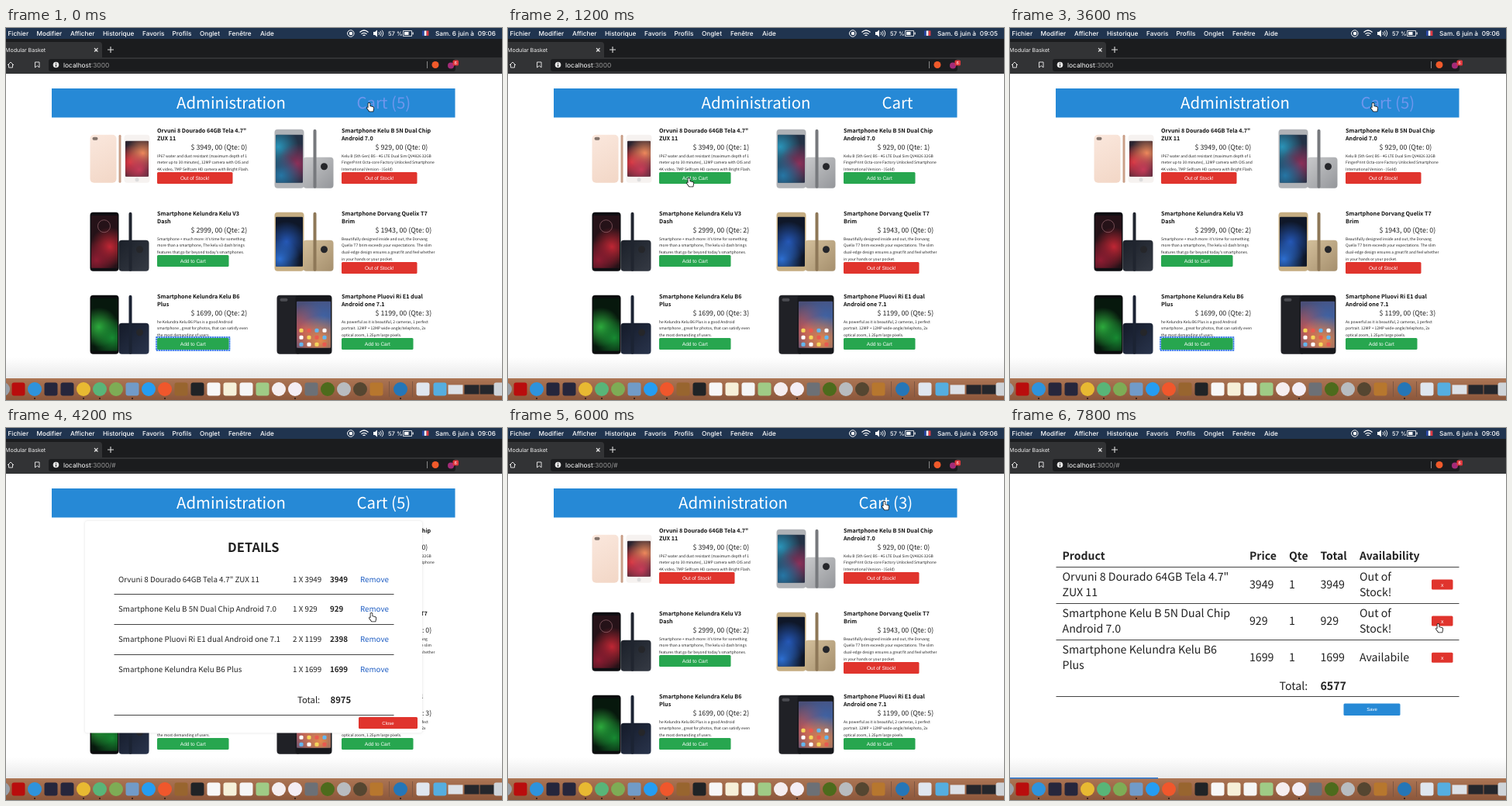
An HTML page with a canvas for the animation above (8 s loop, 640 by 480 pixels).

```html
<!DOCTYPE html>
<html lang="fr">
<head>
<meta charset="utf-8">
<style>
html, body { margin: 0; width: 100%; height: 100%; overflow: hidden; background: #fff; }
canvas { display: block; }
</style>
</head>
<body>
<canvas id="stage" width="640" height="480"></canvas>
<script>
const ctx = document.getElementById('stage').getContext('2d');
const PAGE = '"Noto Sans CJK JP", "Noto Sans CJK SC", "Noto Sans CJK", "Noto Sans", sans-serif';
const UI = 'Inter, sans-serif';
const BUTTON = '"Liberation Sans", sans-serif';
const BLUE = '#2689d6', RED = '#e0342d', GREEN = '#27a64f';
const STEP = 600, LOOP = 8000;

const PRODUCTS = [
  { title: ['Orvuni 8 Dourado 64GB Tela 4.7"', 'ZUX 11'], price: 3949, about: [
    'IP67 water and dust resistant (maximum depth of 1',
    'meter up to 30 minutes), 12MP camera with OIS and',
    '4K video, 7MP Selfcam HD camera with Bright Flash.'] },
  { title: ['Smartphone Kelu B 5N Dual Chip', 'Android 7.0'], price: 929, about: [
    'Kelu B (5th Gen) B5 - 4G LTE Dual Sim QV4826 32GB',
    'FingerPrint Octa-core Factory Unlocked Smartphone',
    'International Version - (Gold)'] },
  { title: ['Smartphone Kelundra Kelu V3', 'Dash'], price: 2999, about: [
    "Smartphone + much more: it's time for something",
    'more than a smartphone, The kelu v3 dash brings',
    "features that go far beyond today's smartphones."] },
  { title: ['Smartphone Dorvang Quelix T7', 'Brim'], price: 1943, about: [
    'Beautifully designed inside and out, the Dorvang',
    'Quelix T7 brim exceeds your expectations. The slim',
    'dual-edge design ensures a great fit and feel whether',
    'in your hands or your pocket.'] },
  { title: ['Smartphone Kelundra Kelu B6', 'Plus'], price: 1699, about: [
    'he Kelundra Kelu B6 Plus is a good Android',
    'smartphone , great for photos, that can satisfy even',
    'the most demanding of users.'] },
  { title: ['Smartphone Pluovi Ri E1 dual', 'Android one 7.1'], price: 1199, about: [
    'As powerful as it is beautiful, 2 cameras, 1 perfect',
    'portrait. 12MP + 12MP wide-angle/telephoto, 2x',
    'optical zoom, 1.25µm large pixels.'] },
];

// One entry per step; modal and table list [product, quantity].
const FOUR = [[0, 1], [1, 1], [5, 2], [4, 1]], THREE = [[0, 1], [1, 1], [4, 1]];
const SCENES = [
  { cart: 5, qty: '002023', focus: 4, hover: true, hand: [470, 102], late: true },
  { cart: 0, qty: '112035', arrow: [300, 215] },
  { cart: 0, qty: '112035', hand: [235, 199] },
  { cart: 1, qty: '012035', focus: 0, hand: [470, 198] },
  { cart: 2, qty: '002035', focus: 1, hand: [451, 409] },
  { cart: 4, qty: '002033', focus: 5, hand: [451, 409] },
  { cart: 5, qty: '002023', focus: 4, hover: true, hand: [470, 102], late: true },
  { cart: 5, qty: '002023', modal: FOUR, hash: true, hand: [473, 244], late: true },
  { cart: 3, qty: '002025', modal: THREE, hash: true, hand: [473, 264], late: true },
  { cart: 3, qty: '002025', modal: THREE, fading: true, hash: true, hand: [479, 364], late: true },
  { cart: 3, qty: '002025', hash: true, hand: [487, 100], late: true },
  { table: THREE, shift: 37, progress: 184, hash: true, arrow: [598, 382], late: true },
  { table: THREE, shift: 0, progress: 187, hash: true, arrow: [572, 300], late: true },
  { table: THREE, shift: 0, progress: 191, hash: true, hand: [554, 258], late: true },
];

// Text is placed by the vertical middle of its capitals.
function text(str, x, y, size, color = '#222', { weight = 400, font = PAGE, align = 'left' } = {}) {
  ctx.font = `${weight} ${size}px ${font}`;
  ctx.textAlign = align;
  ctx.fillStyle = color;
  ctx.fillText(str, x, y + size * 0.365);
}
function rect(x, y, w, h, color, r = 0) {
  ctx.fillStyle = color;
  ctx.beginPath();
  ctx.roundRect(x, y, w, h, r);
  ctx.fill();
}
function disc(x, y, r, color) {
  ctx.fillStyle = color;
  ctx.beginPath();
  ctx.arc(x, y, r, 0, 7);
  ctx.fill();
}
function stroke(d, color, width = 1) {
  ctx.strokeStyle = color;
  ctx.lineWidth = width;
  ctx.stroke(new Path2D(d));
}
function gradient(x, y, w, h, colors) {
  const g = ctx.createLinearGradient(x, y, x + w, y + h);
  colors.forEach((c, i) => g.addColorStop(i / (colors.length - 1), c));
  return g;
}
function button(label, x, y, w, h, color, { size = 6.5, focus = false } = {}) {
  if (focus) {
    rect(x - 2, y - 2, w + 4, h + 4, '#a9cdfb', 2);
    ctx.setLineDash([2, 1]);
    stroke(`M${x - 1} ${y - 1}h${w + 2}v${h + 2}h${-w - 2}z`, '#2f6fe0', 1.4);
    ctx.setLineDash([]);
  }
  rect(x, y, w, h, color, 1.5);
  text(label, x + w / 2, y + h / 2, size, '#fff', { font: BUTTON, align: 'center' });
}

// Each glow is [across, down, colour], as shares of the screen.
function phone(x, y, w, h, body, bezel, base, glows) {
  rect(x, y, w, h, body, 4);
  const sx = x + 1.5, sy = y + bezel, sw = w - 3, sh = h - 2 * bezel;
  rect(sx, sy, sw, sh, base, 1);
  for (const [across, down, color] of glows) {
    const cx = sx + sw * across, cy = sy + sh * down;
    const g = ctx.createRadialGradient(cx, cy, 0, cx, cy, sw * 0.75);
    g.addColorStop(0, color);
    g.addColorStop(1, color + '00');
    rect(sx, sy, sw, sh, g, 1);
  }
}
function backAndSide(x, y, colors, side) {
  rect(x + 37, y + 36, 39, 40, gradient(x + 37, y + 36, 39, 40, colors), 4);
  rect(x + 50, y, 4, 76, side, 2);
  disc(x + 64, y + 48, 4.5, '#25262a');
}
const PHOTOS = [
  (x, y) => {
    rect(x, y + 7, 34, 62, gradient(x, y, 34, 62, ['#fbe9df', '#f3d8c8']), 5);
    rect(x + 3, y + 10, 7, 4, '#83746c', 2);
    rect(x + 37, y + 7, 3, 62, '#c99f88', 1.5);
    phone(x + 44, y + 7, 33, 62, '#f6f2f0', 8, '#2b2430', [[.2, .6, '#e2343c'], [.75, .35, '#f08a5c'], [.6, .8, '#c43b58']]);
    disc(x + 60.5, y + 65, 2.5, '#ddd');
  },
  (x, y) => {
    backAndSide(x, y, ['#c9cacc', '#94969a'], '#77797d');
    phone(x, y, 38, 76, '#b0b2b6', 7, '#243246', [[.1, .25, '#2a93b8'], [.8, .6, '#8c2f58'], [.2, .85, '#2676a5']]);
  },
  (x, y) => {
    backAndSide(x, y, ['#1b2029', '#353a44'], '#20252f');
    phone(x, y, 37, 76, '#0d0e12', 4, '#251218', [[.7, .6, '#c22734'], [.2, .85, '#8f1c32']]);
    ctx.beginPath();
    ctx.arc(x + 18, y + 18, 8, 0, 7);
    ctx.strokeStyle = '#a9747c';
    ctx.lineWidth = .6;
    ctx.stroke();
  },
  (x, y) => {
    backAndSide(x, y, ['#d3bf9b', '#a58f6d'], '#8e7858');
    phone(x, y, 38, 76, '#c5ad82', 6, '#0f1728', [[.4, .5, '#2456b4'], [.15, .85, '#2d6fd2']]);
  },
  (x, y) => {
    backAndSide(x, y, ['#141a28', '#29344c'], '#1b2333');
    phone(x, y, 37, 76, '#0b0d0e', 4, '#07180d', [[.3, .55, '#2fae3e'], [.8, .75, '#178a32']]);
  },
  (x, y) => {
    rect(x + 3, y, 30, 76, '#202126', 4);
    rect(x + 7, y + 4, 10, 4, '#4b4c52', 2);
    phone(x + 27, y, 47, 76, '#17181c', 8, '#4b4f78', [[.3, .6, '#d9584f'], [.8, .35, '#3d62a4'], [.7, .85, '#e58a4c']]);
    for (let i = 0; i < 12; i++)
      rect(x + 32 + i % 4 * 10, y + 43 + (i >> 2) * 9, 5, 5, ['#f5d65b', '#fff', '#63b6ef', '#e85a50'][(i * 3 + (i >> 2)) % 4], 1.5);
  },
];

function card(product, i, qty, focused) {
  const col = i % 2, top = 132.7 + (i >> 1) * 107;
  const x = 195 + col * 238;
  PHOTOS[i](x - 86.5, top - 2);
  product.title.forEach((line, n) => text(line, x, top + n * 10, 7.2, '#111', { weight: 700 }));
  text(`$ ${product.price}, 00 (Qte: ${qty})`, x + 43.5, top + 21, 8.85);
  product.about.forEach((line, n) => text(line, x, top + 32.2 + n * 8.7, 4.93, '#222'));
  const y = Math.round(top + 53.5 + (product.about.length - 3) * 8.7);
  if (qty > 0) button('Add to Cart', x, y, 92.5, 15, GREEN, { focus: focused });
  else button('Out of Stock!', x, y, 97.5, 15, RED, { focus: focused });
}

function shop(s) {
  rect(59, 78, 520.5, 37.5, BLUE);
  const [adminX, cartX] = s.cart ? [290.5, 487.3] : [320, 502.5];
  text('Administration', adminX, 96.5, 20.4, '#fff', { align: 'center' });
  text(s.cart ? `Cart (${s.cart})` : 'Cart', cartX, 96.5, 20.4, s.hover ? '#6f96ec' : '#fff', { align: 'center' });
  PRODUCTS.forEach((p, i) => card(p, i, +s.qty[i], s.focus === i));
}

const total = lines => lines.reduce((sum, [i, n]) => sum + PRODUCTS[i].price * n, 0);
const rule = (x, y, w) => rect(x, y, w, 1, '#444');

function modal(lines, fading) {
  const inset = fading ? 4 : 0, extra = lines.length - 3;
  const top = 139.5 - extra * 19.5, bottom = 374.5 + extra * 19;
  ctx.globalAlpha = fading ? 0.85 : 1;
  ctx.shadowColor = '#0002';
  ctx.shadowBlur = 3;
  rect(102, top, 435, bottom - top, '#fff', 3);
  ctx.shadowBlur = 0;
  ctx.globalAlpha = 1;
  text('DETAILS', 319.3, top + 34, 16.4, '#222', { weight: 700, align: 'center' });
  let y = top + 75;
  lines.forEach(([i, n], row) => {
    const { title, price } = PRODUCTS[i];
    text(title.join(' '), 145 + inset, y, 9.8);
    text(`${n} X ${price}`, 370 - inset, y, 9.8);
    text(n * price, 418 - inset, y, 9.8, '#222', { weight: 700 });
    text('Remove', 457 - inset, y, 9.8, '#2260c4');
    if (row < lines.length - 1) rule(139.5 + inset, Math.round(y + 19), 361 - 2 * inset);
    y += 38.9;
  });
  text('Total:', 376 - inset, y, 11.3);
  text(total(lines), 418.5 - inset, y, 11.3, '#222', { weight: 700 });
  rule(139.5 + inset, Math.round(y + 19.5), 361 - 2 * inset);
  button('Close', 455, bottom - 20.5, 76, 15, RED, { size: 6, focus: fading });
}

function table(lines, shift) {
  ctx.save();
  ctx.translate(shift, 0);
  const columns = [67.5, 309, 360, 400.5, 451];
  const bold = { weight: 700 };
  ['Product', 'Price', 'Qte', 'Total', 'Availability'].forEach((h, i) => text(h, columns[i], 164.5, 14, '#222', bold));
  lines.forEach(([i, n], row) => {
    const { title, price } = PRODUCTS[i], y = 202 + row * 47.1;
    rule(59.5, Math.round(y - 23.5), 520);
    title.forEach((part, k) => text(part, columns[0], y - 10.5 + k * 20.6, 14.2));
    [price, n, price * n].forEach((v, k) => text(v, columns[k + 1], y, 14.2));
    const stock = i === 4 ? ['Availabile'] : ['Out of', 'Stock!'];
    stock.forEach((part, k) => text(part, columns[4], y + (stock.length > 1 ? k * 20.6 - 10.5 : 0), 14.2));
    button('x', 544, y - 6.5, 27.5, 13, RED, { size: 7 });
  });
  text('Total:', 347.5, 332.5, 14.2);
  text(total(lines), columns[3], 332.5, 14.2, '#222', bold);
  rule(59.5, 346, 520);
  button('Save', 430.5, 355.5, 73, 15.5, BLUE, { size: 6 });
  ctx.restore();
}

function menuBar(late) {
  rect(0, 0, 640, 14, '#20344f');
  const ui = { font: UI, weight: 500 };
  const menus = { Fichier: 2.5, Modifier: 39.5, Afficher: 83, Historique: 125, Favoris: 176, Profils: 214.5, Onglet: 250, 'Fenêtre': 287, Aide: 328 };
  for (const name in menus) text(name, menus[name], 7, 8.2, '#fff', ui);
  stroke('M449 7a4.2 4.2 0 1 1-8.4 0a4.2 4.2 0 1 1 8.4 0', '#fff');
  rect(443, 5, 4, 4, '#fff', 1);
  stroke('M456.500 5.500q5.500-5 11 0M458.500 7.800q3.500-3 7 0M460.500 9.800q1.500-1.200 3 0', '#fff', 1.2);
  ctx.fillStyle = '#fff';
  ctx.fill(new Path2D('M474 5h2l3-2.500v9l-3-2.500h-2z'));
  stroke('M481 5q1.500 2 0 4M483 3.800q2.500 3.200 0 6.400M485 2.800q3.500 4.200 0 8.400', '#fff', .9);
  text('57 %', 493, 7, 7.6, '#fff', ui);
  stroke('M512.500 3.500h11v7h-11z', '#fff', .8);
  rect(514, 5, 5.5, 4, '#fff');
  rect(524.5, 5.5, 1.2, 3, '#fff');
  ['#2746a5', '#fff', '#e23b45'].forEach((c, i) => rect(537 + i * 2.8, 3.5, 2.8, 6.5, c));
  text('Sam. 6 juin à', 554, 7, 8.2, '#fff', ui);
  text(late ? '09:06' : '09:05', 632, 7, 8.2, '#fff', { ...ui, align: 'right' });
}

function browser(hash) {
  rect(0, 14, 640, 25, '#1b1c1e');
  rect(0, 18, 124, 21, '#323335', [0, 4, 0, 0]);
  rect(0, 38, 640, 21, '#323335');
  rect(55, 40, 525, 16, '#1b1c1e', 3);
  const ui = { font: UI };
  text('Modular Basket', -1, 28, 7.1, '#eee', ui);
  stroke('M114 26l4.500 4.500m0-4.500l-4.500 4.500M131 28h8m-4-4v8', '#ddd', 1.1);
  stroke('M2 48l4-4l4 4M3.500 47v4h5v-4M37.500 44h5.500v7l-2.700-2.300l-2.800 2.300z', '#ddd');
  disc(64.5, 47.5, 3.8, '#e4e4e4');
  rect(64, 45, 1, 1, '#222');
  rect(64, 47, 1, 3, '#222');
  text('localhost', 74, 47.5, 8.4, '#fff', ui);
  const width = ctx.measureText('localhost').width;
  text(hash ? ':3000/#' : ':3000', 74 + width, 47.5, 8.4, '#999', ui);
  rect(543, 43, 1, 9, '#888');
  disc(554, 47.5, 4.5, '#f05a2b');
  disc(574, 48.5, 4, '#a32b78');
  rect(576.5, 41.5, 7.5, 7, '#e0363b', 1.5);
  text('6', 580.2, 45, 5.5, '#fff', { font: UI, align: 'center' });
}

// Dock marks: "o" round, "s" square, "w" minimised window.
const DOCK = [
  '-4 o #9aa0a8', '16 s #b90d0d', '37 o #2e93dc', '58 s #26263c', '79 s #26263c', '100 o #e8b932',
  '121 o #59b578', '142 o #7eac55', '163 s #719bc8', '184 o #259df2', '205 o #f0572c', '226 s #98652f',
  '247 s #202326', '268 s #f7f7f7', '289 s #f6f0d9', '310 s #f5f5f5', '331 s #9fcb86', '352 o #f5eef0',
  '373 o #f4eef5', '394 s #6c7076', '415 o #4d6b1c', '436 o #b8bcc0', '457 o #554631', '478 s #b7772e',
  '509 o #2576b7', '538 s #dfe6ef', '560 s #55aee0', '580 w #dce1e7', '601 w #25272c', '621 w #25272c', '638 s #cfd4d9',
].map(item => item.split(' '));

function dock(progress) {
  rect(0, 425, 640, 27, gradient(0, 425, 0, 27, ['#fff', '#e9e9e9']));
  rect(0, 452, 640, 28, gradient(0, 452, 0, 28, ['#ac7554', '#8c573b']));
  if (progress) rect(0, 451, progress, 1.5, '#2679d8');
  for (const [pos, kind, color] of DOCK) {
    const x = +pos;
    if (kind === 'o') disc(x, 466, 9, color);
    else if (kind === 's') rect(x - 8.5, 457.5, 17, 17, color, 3);
    else rect(x - 9.5, 460.5, 19, 12, color);
  }
  for (const x of [37, 100, 121, 163, 205, 373, 509]) disc(x, 478, 1, '#251a16');
  for (const x of [494, 524]) rect(x, 456, 1, 20, '#7d5642');
}

function cursor({ hand, arrow }) {
  const [x, y] = hand || arrow;
  ctx.save();
  ctx.translate(x, y);
  ctx.lineJoin = 'round';
  const shape = hand
    ? 'M-2.500-4.500q1-1.500 2 0v3.500l4 1q1 .5 .8 1.500l-.8 4h-4.500l-3-4q0-1.500 1.500-.5z'
    : 'M0 0v8.500l2-1.800l1.500 3.500l1.600-.7l-1.500-3.400h2.800z';
  stroke(shape, hand ? '#111' : '#fff', hand ? 1.6 : 1.2);
  ctx.fillStyle = hand ? '#fff' : '#111';
  ctx.fill(new Path2D(shape));
  ctx.restore();
}

function draw(s) {
  ctx.textRendering = 'geometricPrecision';
  rect(0, 0, 640, 480, '#fff');
  if (s.table) table(s.table, s.shift);
  else shop(s);
  if (s.modal) modal(s.modal, s.fading);
  menuBar(s.late);
  browser(s.hash);
  dock(s.progress);
  cursor(s);
}

function tick() {
  draw(SCENES[Math.floor(performance.now() % LOOP / STEP)]);
  requestAnimationFrame(tick);
}
tick();
</script>
</body>
</html>
```
